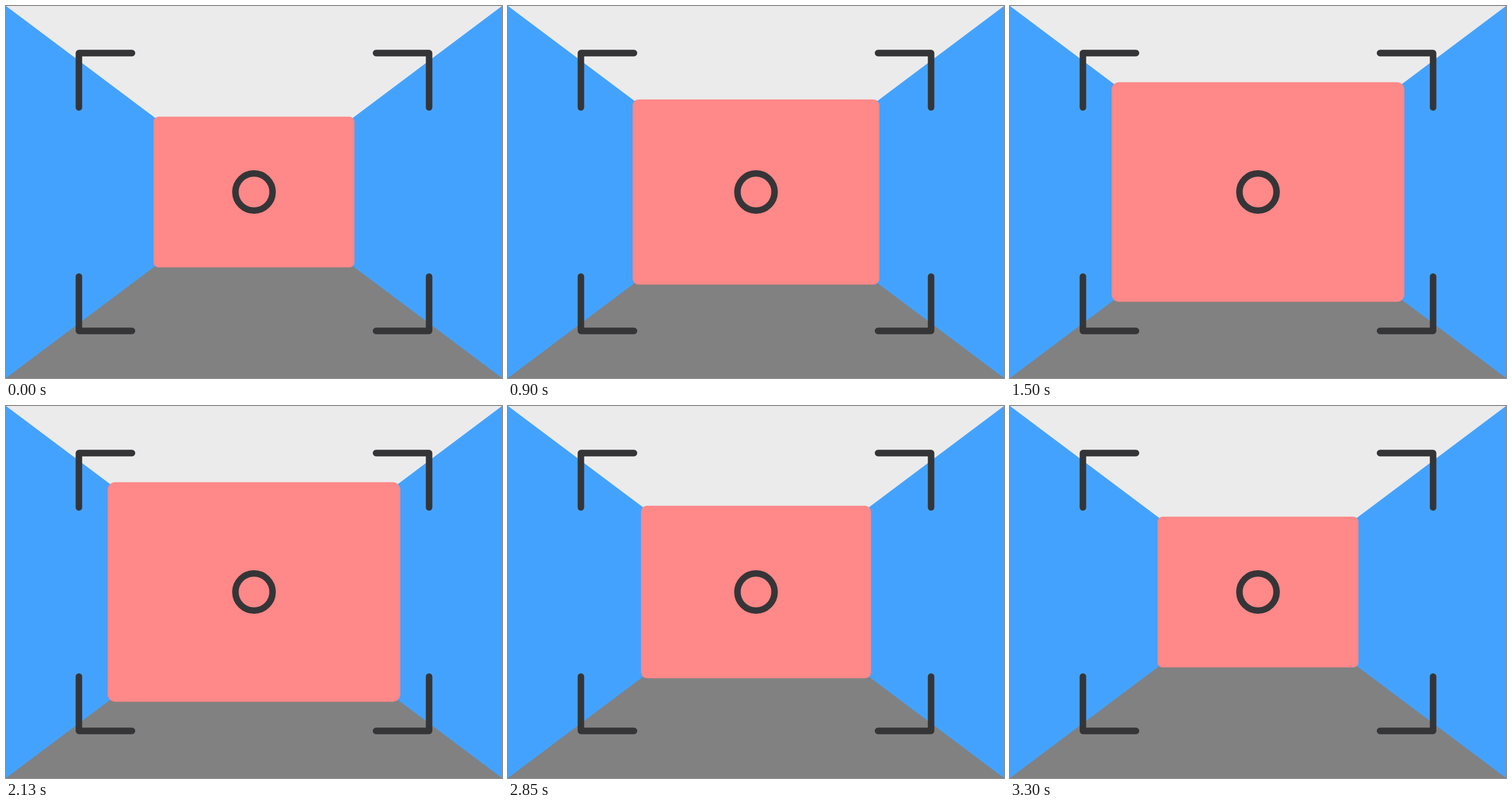
Recreate the animation shown at these times as an HTML page. Size 864 by 648 pixels, loop 3570 ms.

```html
<!DOCTYPE html>
<html lang="en">
<head>
<meta charset="utf-8">
<title>Zooming room</title>
<style>
  html, body { margin: 0; width: 100%; height: 100%; overflow: hidden; }
  svg { display: block; width: 864px; height: 648px; }
  .marks { fill: none; stroke: #353537; stroke-width: 11.3; stroke-linecap: round; stroke-linejoin: round; }
</style>
</head>
<body>
<svg viewBox="0 0 864 648">
  <rect width="864" height="648" fill="#44a2ff"/>
  <path d="M0 0H864L432 324Z" fill="#ebebeb"/>
  <path d="M0 648H864L432 324Z" fill="#818181"/>
  <rect id="wall" fill="#ff8888"/>
  <g class="marks">
    <path d="M219.5 82H127V176.7"/>
    <path d="M644.5 82H737V176.7"/>
    <path d="M219.5 566H127V471.3"/>
    <path d="M644.5 566H737V471.3"/>
    <circle cx="432" cy="324" r="32.35"/>
  </g>
</svg>
<script>
  const LOOP = 3570, STEP = 30, MOVE = 1200;
  const GROW_AT = 300, SHRINK_AT = 2100;
  const SMALL = 350, LARGE = 510;
  const wall = document.getElementById('wall');

  const ease = (t, start) => {
    const u = Math.min(1, Math.max(0, (t - start) / MOVE));
    return u * u * (3 - 2 * u);
  };

  function draw(now) {
    const t = Math.floor((now % LOOP + 0.5) / STEP) * STEP;
    const w = SMALL + (LARGE - SMALL) * (ease(t, GROW_AT) - ease(t, SHRINK_AT));
    const h = w * 0.75;
    const box = { x: 432 - w / 2, y: 324 - h / 2, width: w, height: h, rx: w * 0.0255 };
    for (const key in box) wall.setAttribute(key, box[key]);
  }

  function tick(now) {
    draw(now);
    requestAnimationFrame(tick);
  }

  draw(0);
  requestAnimationFrame(tick);
</script>
</body>
</html>
```
